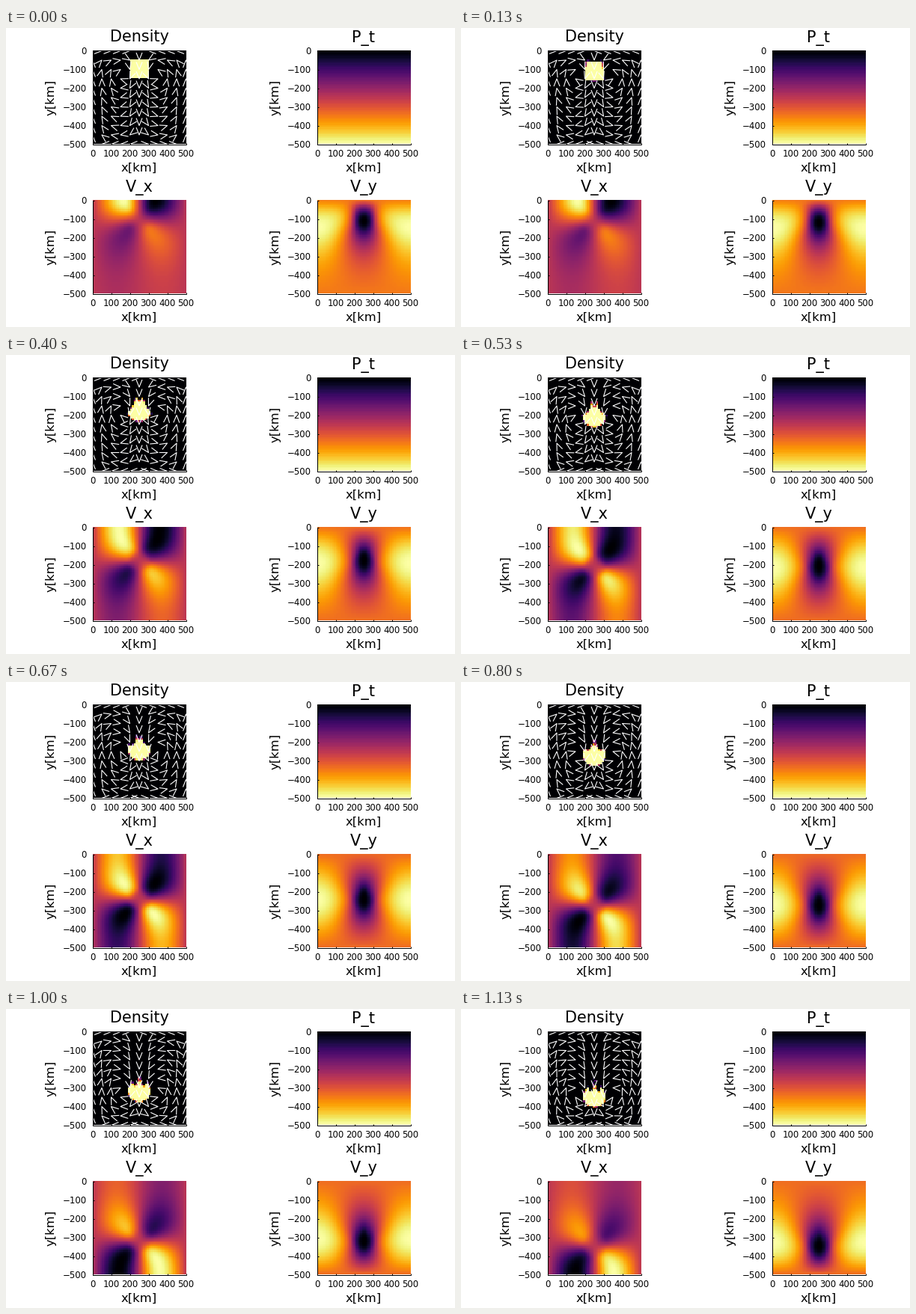
Animation of 600x400 px, one loop 1190 ms. Source, as a matplotlib script:

```python
import numpy as np
import matplotlib.pyplot as plt
from matplotlib.animation import FuncAnimation
from matplotlib.collections import LineCollection
from matplotlib.patches import Rectangle

SIZE = 500.0      # km
CELLS = 50
STEP = SIZE / CELLS
PANEL = 125.0     # px
SCALE = PANEL / SIZE
FRAMES = 18
LOOP_MS = 1190
SUBSTEPS = 4

nodes = np.linspace(0, SIZE, CELLS + 1)
centers = (nodes[:-1] + nodes[1:]) / 2
waves = np.pi * np.arange(1, CELLS) / SIZE
KX, KY = waves[None, :], waves[:, None]
K4 = (KX**2 + KY**2) ** 2


def basis(points):
    phase = np.outer(points, waves)
    return np.sin(phase), np.cos(phase)


SIN_C, COS_C = basis(centers)
SIN_N, COS_N = basis(nodes)


def spectrum(rho):
    """Forcing of the free-slip Stokes stream function, rows are depth."""
    return SIN_C.T @ rho @ COS_C / K4


def velocity(modes, sin, cos):
    across = -cos @ (KX * KY * modes) @ sin.T
    down = sin @ (KX**2 * modes) @ cos.T
    return across, down


def sample(field, x, d):
    gx, gd = x / STEP, d / STEP
    i = np.clip(gx.astype(int), 0, CELLS - 1)
    j = np.clip(gd.astype(int), 0, CELLS - 1)
    fx, fd = gx - i, gd - j
    top = field[j, i] * (1 - fx) + field[j, i + 1] * fx
    low = field[j + 1, i] * (1 - fx) + field[j + 1, i + 1] * fx
    return top * (1 - fd) + low * fd


def to_cells(x, d, heavy):
    i = np.clip((x / STEP).astype(int), 0, CELLS - 1)
    j = np.clip((d / STEP).astype(int), 0, CELLS - 1)
    index = j * CELLS + i
    total = np.bincount(index, heavy, CELLS**2)
    count = np.bincount(index, minlength=CELLS**2)
    return (total / np.maximum(count, 1)).reshape(CELLS, CELLS)


def simulate():
    rng = np.random.default_rng(4)
    n = 4 * CELLS
    d, x = np.indices((n, n)).reshape(2, -1)
    x = (x + rng.uniform(0.1, 0.9, n * n)) * SIZE / n
    d = (d + rng.uniform(0.1, 0.9, n * n)) * SIZE / n
    block = (abs(x - 250) < 50) & (abs(d - 100) < 50)
    heavy = block.astype(float)
    # Mean depth of the block over time sets the pace.
    depth = np.interp(np.arange(FRAMES), [0, 4, 8, 10, 12, 15, 17],
                      [100, 149, 212, 244, 275, 322, 351])
    states = []
    for k in range(FRAMES):
        rho = to_cells(x, d, heavy)
        states.append((rho, spectrum(rho)))
        if k == FRAMES - 1:
            break
        start = d[block].mean()
        for s in range(SUBSTEPS):
            u, w = velocity(spectrum(to_cells(x, d, heavy)), SIN_N, COS_N)
            goal = start + (depth[k + 1] - start) * (s + 1) / SUBSTEPS
            dt = (goal - d[block].mean()) / sample(w, x[block], d[block]).mean()
            xm = np.clip(x + dt / 2 * sample(u, x, d), 0, SIZE)
            dm = np.clip(d + dt / 2 * sample(w, x, d), 0, SIZE)
            x = np.clip(x + dt * sample(u, xm, dm), 0, SIZE)
            d = np.clip(d + dt * sample(w, xm, dm), 0, SIZE)
    return states


fig = plt.figure(figsize=(6, 4), dpi=100, facecolor="white")
ax = fig.add_axes([0, 0, 1, 1])
ax.axis("off")
plt.rcParams["font.family"] = "DejaVu Sans"
PT = 0.72  # points per pixel


def label(x, y, text, px, **style):
    ax.text(x, y, text, fontsize=px * PT, color="black", **style)


def line(xs, ys):
    ax.plot(xs, ys, color="black", lw=PT, solid_capstyle="butt", zorder=4)


def panel(left, top, title):
    right, bottom = left + PANEL, top + PANEL
    image = ax.imshow(np.zeros((CELLS, CELLS)), cmap="inferno", aspect="auto",
                      extent=(left, right, bottom, top),
                      interpolation="nearest", zorder=1)
    line([left, left], [top, bottom])
    line([left, right], [bottom, bottom])
    for value in range(0, 501, 100):
        x, y = left + value * SCALE, top + value * SCALE
        line([x, x], [bottom, bottom - 2])
        line([left, left + 2], [y, y])
        label(x, bottom + 16.2, str(value), 11.8, ha="center")
        name = f"\u2212{value}" if value else "0"
        label(left - 8, y + 4.3, name, 11.8, ha="right")
    mid = left + PANEL / 2
    label(mid, top - 12, title, 20.8, ha="center")
    label(mid, bottom + 36, "x[km]", 16.4, ha="center")
    label(left - 55, top + PANEL / 2, "y[km]", 16.4, ha="center",
          va="center", rotation=90)
    return image


LEFT, TOP = 115.5, 30.5
density = panel(LEFT, TOP, "Density")
pressure = panel(LEFT + 300, TOP, "P_t")
vel_x = panel(LEFT, TOP + 200, "V_x")
vel_y = panel(LEFT + 300, TOP + 200, "V_y")
pressure.set_data(np.repeat(centers[:, None], CELLS, axis=1))
pressure.set_clim(centers[0], centers[-1])
density.set_clim(0, 1)

arrows = LineCollection([], colors="white", linewidths=0.8, zorder=3)
ax.add_collection(arrows, autolim=False)
arrows.set_clip_path(Rectangle((LEFT, TOP), PANEL, PANEL,
                               transform=ax.transData))
ax.set_xlim(0, 600)
ax.set_ylim(400, 0)

coarse = nodes[::5]
SIN_A, COS_A = basis(coarse)
TIP_X, TIP_Y = np.meshgrid(LEFT + coarse * SCALE, TOP + coarse * SCALE)


def arrowheads(modes, length=10, half=4):
    u, w = velocity(modes, SIN_A, COS_A)
    speed = np.hypot(u, w)
    moving = speed > 1e-7 * speed.max()
    dx, dy = u[moving] / speed[moving], w[moving] / speed[moving]
    x, y = TIP_X[moving], TIP_Y[moving]
    legs = [(x - length * dx - side * half * dy,
             y - length * dy + side * half * dx) for side in (-1, 1)]
    return np.array([legs[0], (x, y), legs[1]]).transpose(2, 0, 1)


def show(image, field):
    image.set_data(field)
    image.set_clim(field.min(), field.max())


states = simulate()


def update(k):
    rho, modes = states[k]
    u, w = velocity(modes, SIN_C, COS_C)
    density.set_data(np.clip(1.8 * (rho - 0.5) + 0.5, 0, 1))
    show(vel_x, u)
    show(vel_y, -w)
    arrows.set_segments(arrowheads(modes))
    return density, vel_x, vel_y, arrows


anim = FuncAnimation(fig, update, frames=FRAMES, interval=LOOP_MS / FRAMES,
                     repeat=True, repeat_delay=0, blit=False)
plt.show()
```
